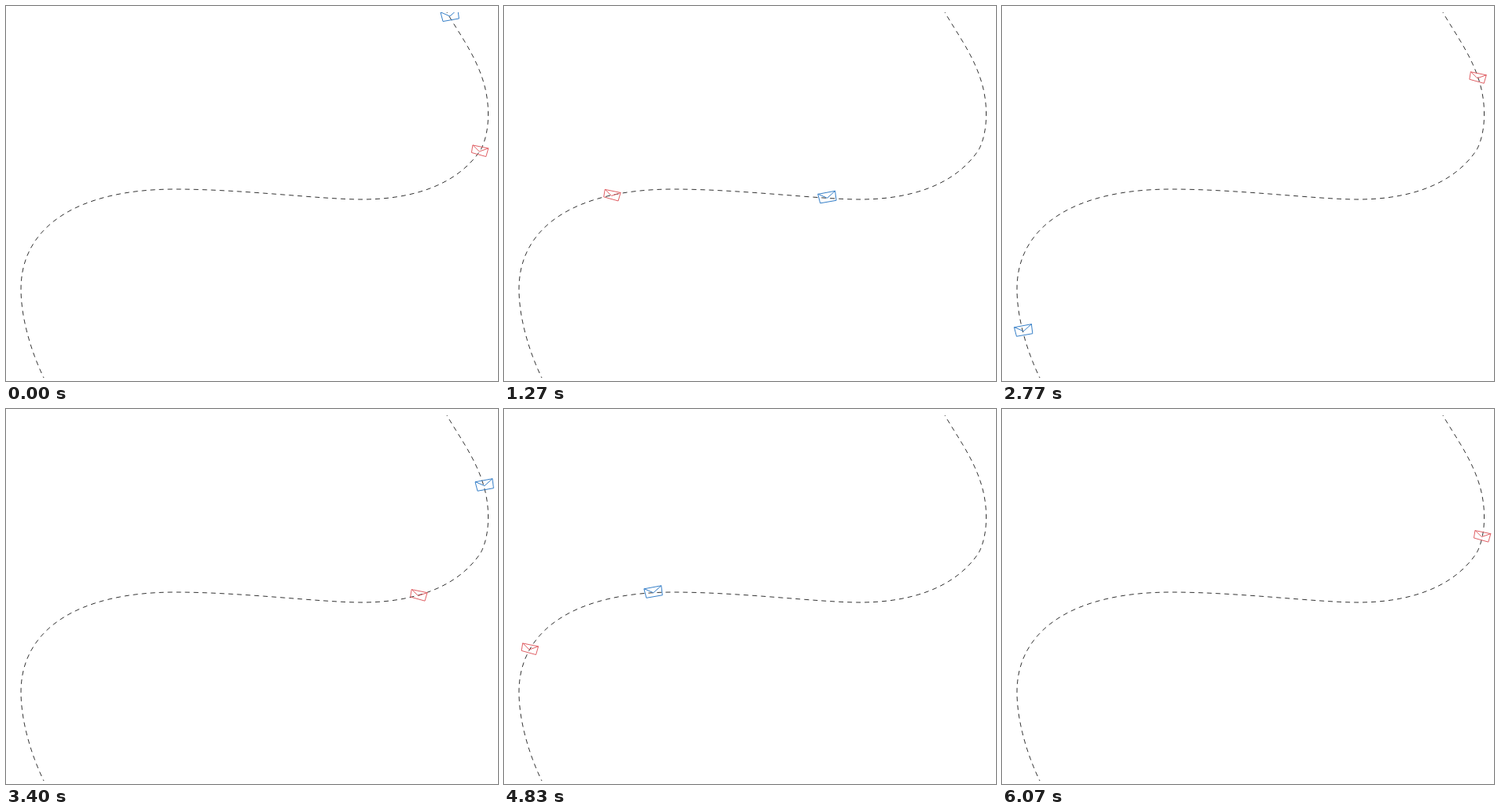
Recreate the animation shown at these times as an HTML page. Size 625 by 477 pixels, loop 6.15 s.

```html
<!DOCTYPE html>
<html lang="en">
<head>
<meta charset="utf-8">
<title>Envelopes on a path</title>
<style>
  html, body { margin: 0; width: 100%; height: 100%; overflow: hidden; background: #fff; }
  svg { display: block; width: 625px; height: 477px; }
  path { fill: none; stroke-width: 1; stroke-linejoin: round; stroke-linecap: round; }
  #route { stroke: #333; stroke-dasharray: 6 5; stroke-dashoffset: -2.2; stroke-linecap: butt; }
  #red { stroke: #e06065; }
  #blue { stroke: #367fc8; }
</style>
</head>
<body>
<svg viewBox="0 0 625 477">
  <clipPath id="view"><rect x="8" y="8" width="617" height="465"/></clipPath>
  <g clip-path="url(#view)">
    <path id="route" d="M551 -7.75 L560 8 C580 43 612 82 612.5 135 C613 155 609 172 603 183
      C571 231 510 246 452 246 C400 246 300 233 215 233 C92 233 19 280 19 360
      C19 397 32 440 48 473"/>
    <path id="red" d="M-9 -7 L10.5 -3 L7.5 7.5 L-10.5 2.5 Z M-9 -7 L-1 1 L10.5 -3"/>
    <path id="blue" d="M-10.5 -5 L11 -9 L12.5 3 L-7.5 6.5 Z M-10.5 -5 L1 0 L11 -9"/>
  </g>
</svg>
<script>
const LOOP = 6150, STEPS = 78, LAP = STEPS / 2;
const LEAD = { red: 8.7, blue: 1 }; // steps into the lap at the start

const byId = id => document.getElementById(id);
const route = byId('route');

// Steady pace on three stretches, fastest in the middle
const pace = [[0, 0], [16, 383], [24, 678], [LAP, route.getTotalLength()]];

function distanceAt(phase) {
  const next = pace.findIndex(([end]) => end > phase);
  const [p0, d0] = pace[next - 1], [p1, d1] = pace[next];
  return d0 + (d1 - d0) * (phase - p0) / (p1 - p0);
}

function draw(time) {
  const step = Math.floor((time % LOOP) / LOOP * STEPS + 0.1);
  for (const id in LEAD) {
    const { x, y } = route.getPointAtLength(distanceAt((step + LEAD[id]) % LAP));
    byId(id).setAttribute('transform', `translate(${x} ${y})`);
  }
}

const start = performance.now();
function tick() {
  draw(performance.now() - start);
  requestAnimationFrame(tick);
}
tick();
</script>
</body>
</html>
```
